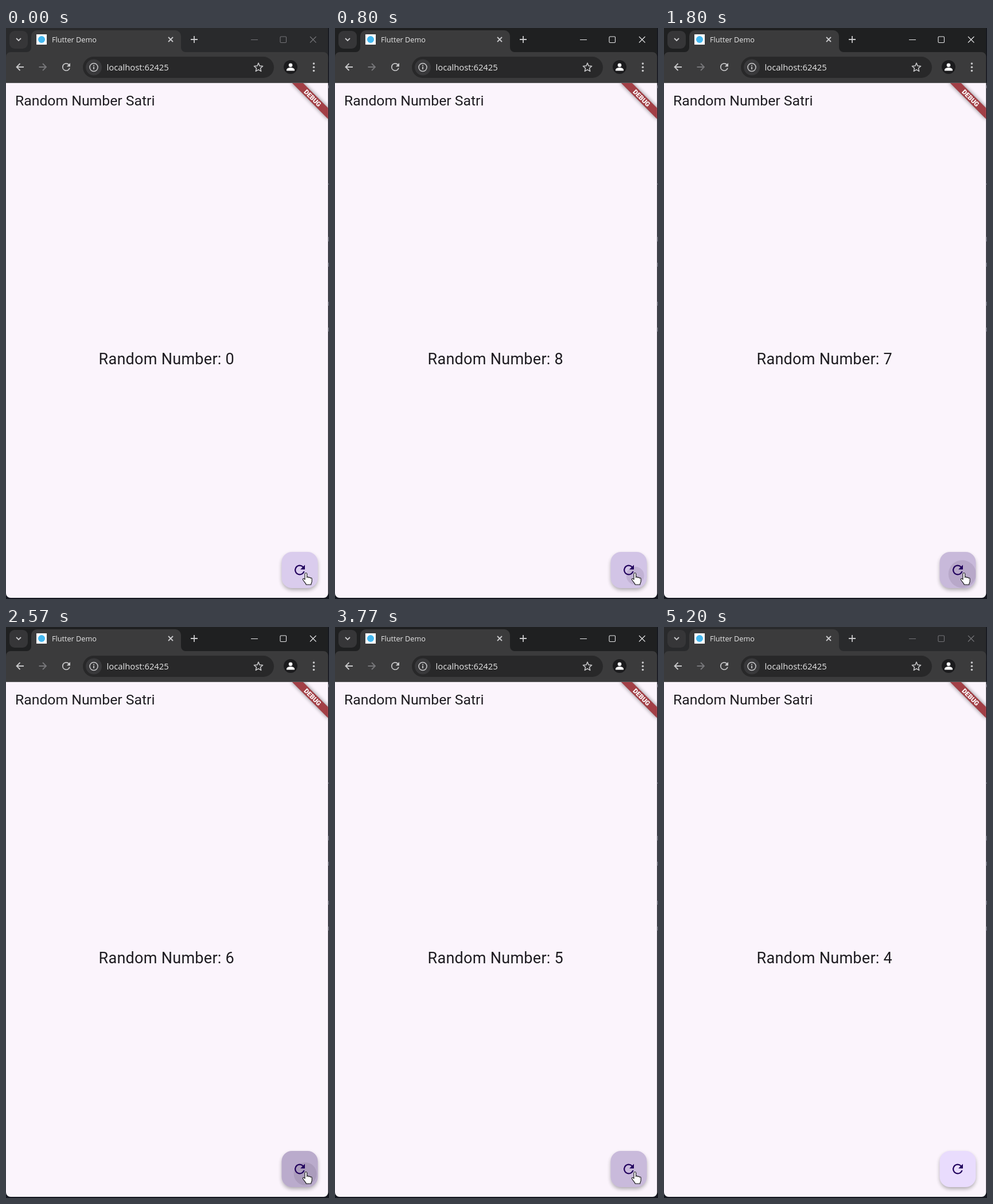
An HTML page for the animation above (5280 ms loop, 563 by 995 pixels).

```html
<!DOCTYPE html>
<html lang="en">
<head>
<meta charset="utf-8">
<title>Flutter Demo</title>
<style>
html, body { margin: 0; width: 100%; height: 100%; overflow: hidden; background: #14161f; }
svg { display: block; width: 563px; height: 995px; }
.ui { font-family: "Open Sans", "Noto Sans", sans-serif; fill: #e8e8e8; }
.app { font-family: Roboto, sans-serif; fill: #1d1b20; }
.line { fill: none; stroke: #c9c9cb; stroke-width: 1.8; }
</style>
</head>
<body>
<svg viewBox="0 0 563 995" xmlns="http://www.w3.org/2000/svg">
  <defs>
    <path id="refresh" d="M17.65 6.35A7.96 7.96 0 0 0 12 4a8 8 0 1 0 7.73 10h-2.08A6 6 0 1 1 12 6c1.66 0 3.14.69 4.22 1.78L13 11h7V4z"/>
    <clipPath id="page"><path d="M0 96H561.5V985a8 8 0 0 1-8 8H8a8 8 0 0 1-8-8z"/></clipPath>
    <clipPath id="fabShape"><rect x="480.5" y="913" width="63" height="63" rx="18"/></clipPath>
    <filter id="bannerBlur" x="-30%" y="-150%" width="160%" height="400%"><feGaussianBlur stdDeviation="3.6"/></filter>
    <filter id="fabBlur" x="-40%" y="-40%" width="180%" height="180%"><feGaussianBlur stdDeviation="3.6"/></filter>
  </defs>

  <rect width="563" height="995" fill="#14161f"/>
  <path d="M562.5 100v5M562.5 271v2M562.5 364v8M562.5 409v7M562.5 477v7M562.5 522v7" stroke="#5b6070"/>

  <!-- browser chrome -->
  <rect id="strip" width="561.5" height="60"/>
  <rect x="6" y="5" width="32" height="31" rx="9" fill="#363638"/>
  <path class="line" d="M18 18l4 4 4-4"/>
  <path d="M0 95V50a8 8 0 0 1 8-8H36a8 8 0 0 0 8-8V14a10 10 0 0 1 10-10H295a10 10 0 0 1 10 10V34a8 8 0 0 0 8 8H553.5a8 8 0 0 1 8 8V95z" fill="#3b3b3c"/>
  <rect y="95" width="561.5" height="1" fill="#5c5c5e"/>
  <rect x="53" y="11" width="18" height="18" fill="#fff"/>
  <circle cx="62" cy="20" r="6" fill="#43b8f0"/>
  <text class="ui" x="80" y="25" font-size="12.7">Flutter Demo</text>
  <path class="line" d="M283 16l8 8M291 16l-8 8M322 20h12M328 14v12"/>
  <g id="controls" fill="none" stroke-width="1.1">
    <path d="M427 20.5h12M530 15l10.500 10.500M540.500 15l-10.500 10.500"/>
    <rect x="478" y="15" width="10.500" height="10.500" rx="1.500"/>
  </g>
  <path class="line" d="M31 68H18.500M24.500 62l-6 6 6 6"/>
  <path class="line" d="M57.500 68H70M64 62l6 6-6 6" style="stroke:#77777a"/>
  <use href="#refresh" transform="translate(94.400 57.500) scale(.88)" fill="#c9c9cb"/>
  <rect x="134" y="50" width="333" height="37" rx="18.500" fill="#282829"/>
  <circle cx="153" cy="68.500" r="14" fill="#39393b"/>
  <circle class="line" cx="153" cy="68.500" r="7" style="stroke-width:1.500"/>
  <path class="line" d="M153 67.500v4.500M153 64.500v1.700"/>
  <text class="ui" x="175.500" y="74" font-size="14.800">localhost:62425</text>
  <path id="star" class="line" style="stroke-width:1.500" stroke-linejoin="round"/>
  <circle cx="496" cy="68" r="12" fill="#1b1b1d"/>
  <circle cx="496" cy="64.800" r="3.300" fill="#fff"/>
  <path d="M489 74.500v-1.500c0-2.600 4-4 7-4s7 1.400 7 4v1.500z" fill="#fff"/>
  <g fill="#c9c9cb"><circle cx="536.500" cy="62" r="1.800"/><circle cx="536.500" cy="68.200" r="1.800"/><circle cx="536.500" cy="74.500" r="1.800"/></g>

  <!-- app -->
  <g clip-path="url(#page)">
    <rect y="95" width="563" height="900" fill="#fbf4fc"/>
    <text class="app" x="16" y="135" font-size="24.750">Random Number Satri</text>
    <text id="result" class="app" x="279.800" y="585.500" font-size="27" letter-spacing=".28" text-anchor="middle"></text>
    <g transform="translate(561.500 95) rotate(45)">
      <rect x="-45" y="31.500" width="90" height="13.500" fill="#000" opacity=".5" filter="url(#bannerBlur)"/>
      <rect x="-45" y="31.500" width="90" height="13.500" fill="#a23f46"/>
      <text x="0" y="42.300" font-family="Roboto, sans-serif" font-size="11.475" font-weight="900" fill="#fff" text-anchor="middle">DEBUG</text>
    </g>
    <rect x="481" y="917" width="62" height="62" rx="18" fill="#000" opacity=".32" filter="url(#fabBlur)"/>
    <g clip-path="url(#fabShape)">
      <rect x="480" y="912" width="64" height="65" fill="#e9dcfd"/>
      <g fill="#281432">
        <rect id="hover" x="480" y="912" width="64" height="65"/>
        <rect id="press" x="480" y="912" width="64" height="65"/>
        <g id="ripples"></g>
      </g>
    </g>
    <use href="#refresh" transform="translate(498.500 931) scale(1.125)" fill="#21005d"/>
  </g>
  <path id="cursor" d="M521 951.500c0-2.600 3.600-2.600 3.600 0v6c.4-1.500 3-1.400 3.100.5.600-1.300 2.800-1 2.900.8.700-1.100 2.600-.6 2.600 1.100v4.300c0 2.200-1.500 3-1.500 5.800h-8.400c-.6-2.500-3.200-4.500-5.600-8.200-1.200-2 .7-3.300 2.100-2l1.200 1.300z" fill="#fff" stroke="#111" stroke-width="1.100" stroke-linejoin="round"/>
</svg>
<script>
const LOOP = 5280;
const FOCUS_IN = 250, FOCUS_OUT = 5000, LEAVE = 4280;
const TOUCH = [524, 955], CENTER = [512, 944.5];
const FULL_RADIUS = 44.6;

// press time, release time, number shown after release
const taps = [
  [250, 360, 8], [720, 850, 2], [1190, 1290, 7],
  [1580, 1860, 9], [2270, 2360, 6], [2410, 2600, 7],
  [2640, 3250, 1], [3450, 3540, 5], [3800, 3900, 4]
];

const $ = id => document.getElementById(id);
const clamp = v => Math.max(0, Math.min(1, v));
const mix = (a, b, k) => a + (b - a) * k;

// cubic-bezier(.25, .1, .25, 1)
function ease(x) {
  let lo = 0, hi = 1;
  for (let i = 0; i < 20; i++) {
    const s = (lo + hi) / 2, r = 1 - s;
    if (.75 * r * r * s + .75 * r * s * s + s ** 3 < x) lo = s; else hi = s;
  }
  const r = 1 - lo;
  return .3 * r * r * lo + 3 * r * lo * lo + lo ** 3;
}

function pressLevel(t, [down, up]) {
  return clamp(clamp((Math.min(t, up) - down) / 200) - Math.max(0, t - up) / 200);
}

// The splash grows slowly while held and quickly once released.
function splash(t, [down, up]) {
  const growth = ease(clamp((Math.min(t, up) - down) / 1000 + Math.max(0, t - up) / 225));
  return {
    cx: mix(TOUCH[0], CENTER[0], growth),
    cy: mix(TOUCH[1], CENTER[1], growth),
    r: mix(.3, 1, growth) * FULL_RADIUS,
    opacity: .1 * clamp((t - down) / 75) * (1 - clamp((t - up - 225) / 150))
  };
}

function setAttributes(node, values) {
  for (const key in values) node.setAttribute(key, values[key]);
}

const ripples = taps.map(() => $("ripples").appendChild(
  document.createElementNS("http://www.w3.org/2000/svg", "circle")));

const starPoints = Array.from({ length: 10 }, (_, i) => {
  const a = i * Math.PI / 5 - Math.PI / 2, r = i % 2 ? 3.6 : 8;
  return `${440 + r * Math.cos(a)} ${69 + r * Math.sin(a)}`;
});
$("star").setAttribute("d", `M${starPoints.join("L")}z`);

function draw(t) {
  const focused = t >= FOCUS_IN && t < FOCUS_OUT;
  $("strip").setAttribute("fill", focused ? "#1f2021" : "#292a2c");
  $("controls").setAttribute("stroke", focused ? "#e8e8ea" : "#747478");

  const shown = taps.filter(tap => t >= tap[1]).pop();
  $("result").textContent = `Random Number: ${shown ? shown[2] : 0}`;

  $("hover").setAttribute("opacity", .08 * (1 - clamp((t - LEAVE) / 50)));
  $("press").setAttribute("opacity", .1 * Math.max(...taps.map(tap => pressLevel(t, tap))));
  taps.forEach((tap, i) => setAttributes(ripples[i], splash(t, tap)));
  $("cursor").setAttribute("visibility", t < LEAVE ? "visible" : "hidden");
}

function tick() {
  draw(performance.now() % LOOP);
  requestAnimationFrame(tick);
}
tick();
</script>
</body>
</html>
```
